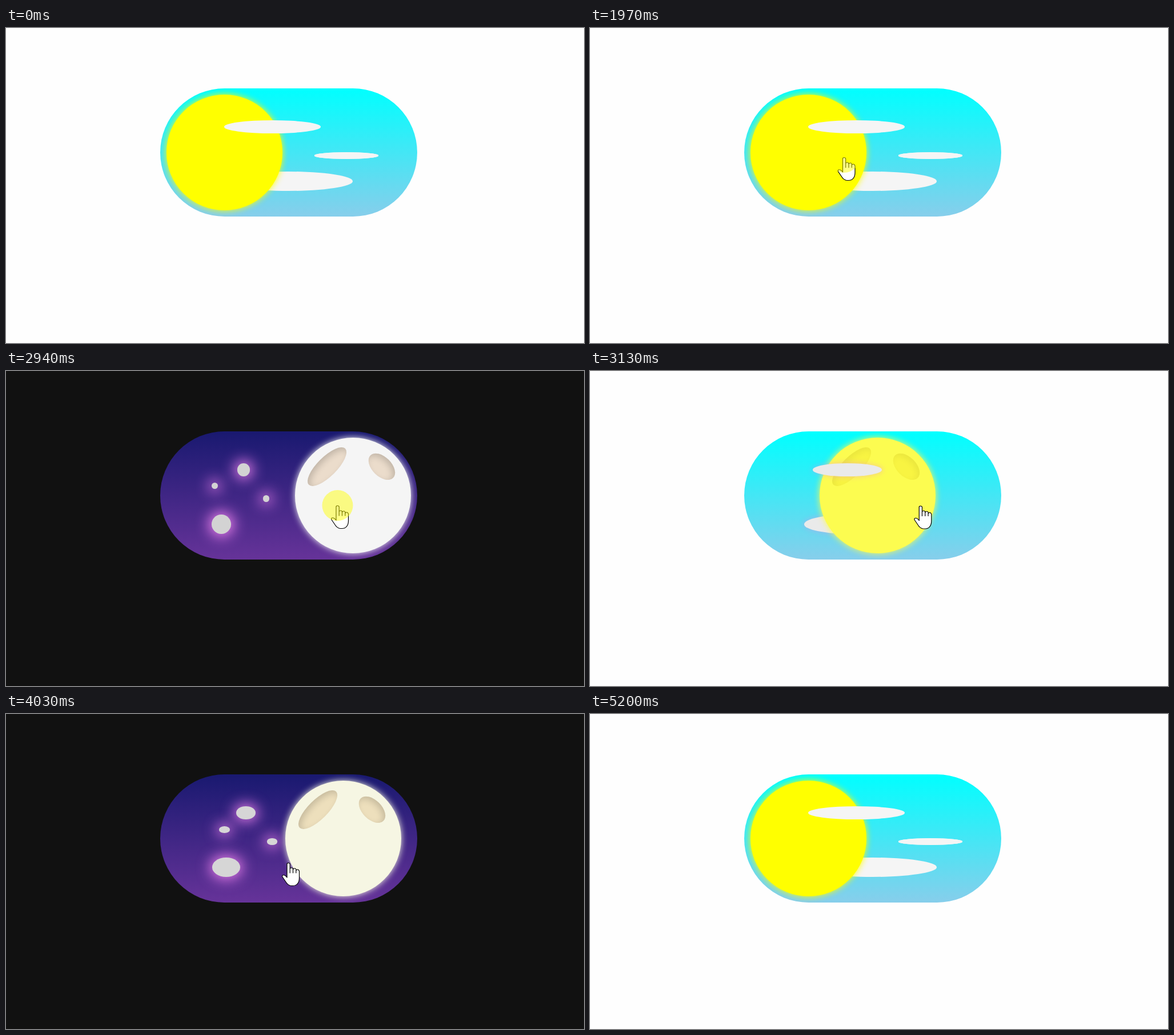
These frames come from a looping animation (1012x553 px, 6150 ms). An HTML page:

```html
<!DOCTYPE html>
<html lang="en">
<head>
<meta charset="utf-8">
<title>Day and night toggle</title>
<style>
  html, body { margin: 0; width: 100%; height: 100%; overflow: hidden; }
  #stage { --p: 0; --slide: 0; position: relative; width: 1012px; height: 553px; overflow: hidden; font-size: 11.25px; background: #fefefe; }
  #stage div { position: absolute; border-radius: 50%; }
  #stage #toggle {
    left: 269.75px; top: 105.75px; width: 40em; height: 20em; border-radius: 10em; overflow: hidden;
    background: linear-gradient(cyan, skyblue);
  }
  #stage.night { background: #111; }
  #stage.night #toggle { background: linear-gradient(midnightblue, rebeccapurple); }

  /* A wide cloud by day shrinks to a round star at night */
  .puff {
    --grey: calc(245 - 34 * var(--p));
    left: calc(1em * (var(--day) + (var(--night) - var(--day)) * var(--p)));
    top: calc(1em * (var(--y) - var(--rise, 0) * var(--p)));
    width: calc(1em * (var(--size) + (5 + 4 * var(--size)) * (1 - var(--p))));
    height: calc(1em * var(--size));
    background: rgb(var(--grey), var(--grey), var(--grey));
    box-shadow: 0 0 calc(25px * var(--p)) calc(5px * var(--p)) rgba(238, 130, 238, var(--p));
  }
  #ball {
    --skin: rgb(calc(255 - 10 * var(--p)), calc(255 - 10 * var(--p)), calc(245 * var(--p)));
    left: calc(1em + 20em * var(--slide)); top: 1em; width: 18em; height: 18em;
    background: var(--skin); box-shadow: 0 0 1em var(--skin);
  }
  .crater {
    top: 3em; height: 3em;
    background: rgb(calc(255 - 20 * var(--p)), calc(255 - 35 * var(--p)), calc(203 * var(--p)));
    box-shadow: inset 0 .5em 1em rgba(0, 0, 0, calc(.18 * var(--p)));
  }
  #left { left: 1em; width: 8em; transform: rotate(-45deg); }
  #right { left: 11em; width: 5em; transform: rotate(45deg); }
  svg { position: absolute; left: 0; top: 0; }
</style>
</head>
<body>
<div id="stage">
  <div id="toggle">
    <div class="puff" style="--day:24; --night:8; --y:10; --size:1; --rise:2"></div>
    <div class="puff" style="--day:24; --night:16; --y:10; --size:1"></div>
    <div class="puff" style="--day:10; --night:8; --y:13; --size:3"></div>
    <div id="ball"><div class="crater" id="left"></div><div class="crater" id="right"></div></div>
    <div class="puff" style="--day:10; --night:12; --y:5; --size:2"></div>
  </div>
  <svg width="1012" height="553">
    <g id="pointer">
      <path fill="#fff" stroke="#000" stroke-width="1.2" stroke-linejoin="round"
        d="M-2.5 26V2.6Q-2.5 .5 0 .5T2.7 2.6V18V11Q3 9 5.5 9T8 12V18V12Q8.500 10 11 10T13.300 13V18V14Q14 12 16 12T19 15V27C19 36 14 40.500 8 40.500H5C1 40.500-1 38-3 36L-10.500 25C-12 21-7 20-2.500 26Z"/>
      <circle id="press" r="27" fill="yellow" fill-opacity=".47"/>
    </g>
  </svg>
</div>
<script>
const LOOP = 6150, ENTER = 670, LEAVE = 5200;
const HOLD = 73, FADE = 300, SLIDE = 247;
const presses = [1970, 2940, 3758, 4500];

const entry = { x: 657, y: 538 };
const moves = [
  { start: 670, end: 1230, x: 464.5, y: 245 },
  { start: 1230, end: 1510, x: 445, y: 227 },
  { start: 2060, end: 2260, x: 502, y: 239 },
  { start: 2260, end: 2540, x: 580.5, y: 236 },
  { start: 3080, end: 3690, x: 494.5, y: 261 },
  { start: 5020, end: 5230, x: 955, y: 730 }
];

const stage = document.getElementById('stage');
const pointer = document.getElementById('pointer');
const press = document.getElementById('press');

const clamp = u => Math.min(1, Math.max(0, u));
const smooth = u => u * u * (3 - 2 * u);
const show = (element, visible) => { element.style.display = visible ? '' : 'none'; };

function bezier(x1, y1, x2, y2) {
  const at = (a, b, u) => 3 * a * u * (1 - u) ** 2 + 3 * b * u * u * (1 - u) + u ** 3;
  return x => {
    let low = 0, high = 1;
    for (let i = 0; i < 24; i++) {
      const mid = (low + high) / 2;
      if (at(x1, x2, mid) < x) low = mid; else high = mid;
    }
    return at(y1, y2, high);
  };
}
const ease = bezier(.25, .1, .25, 1);
const easeInOut = bezier(.42, 0, .58, 1);

// Each release flips the toggle: 0 is day, 1 is night
function nightness(t, duration, easing) {
  return presses.reduce((sum, at, i) => {
    const u = clamp((t - at - HOLD) / duration);
    return u > 0 ? sum + (i % 2 ? -1 : 1) * easing(u) : sum;
  }, 0);
}

function movePointer(t) {
  let { x, y } = entry;
  for (const move of moves) {
    const u = smooth(clamp((t - move.start) / (move.end - move.start)));
    x += (move.x - x) * u;
    y += (move.y - y) * u;
  }
  pointer.setAttribute('transform', `translate(${x} ${y})`);
  show(pointer, t >= ENTER && t < LEAVE);
  show(press, presses.some(at => t >= at && t < at + HOLD));
}

function draw(t) {
  const flips = presses.filter(at => t >= at + HOLD).length;
  stage.classList.toggle('night', flips % 2 === 1);
  stage.style.setProperty('--p', nightness(t, FADE, ease).toFixed(4));
  stage.style.setProperty('--slide', nightness(t, SLIDE, easeInOut).toFixed(4));
  movePointer(t);
}

function frame() {
  draw(performance.now() % LOOP);
  requestAnimationFrame(frame);
}
frame();
</script>
</body>
</html>
```
